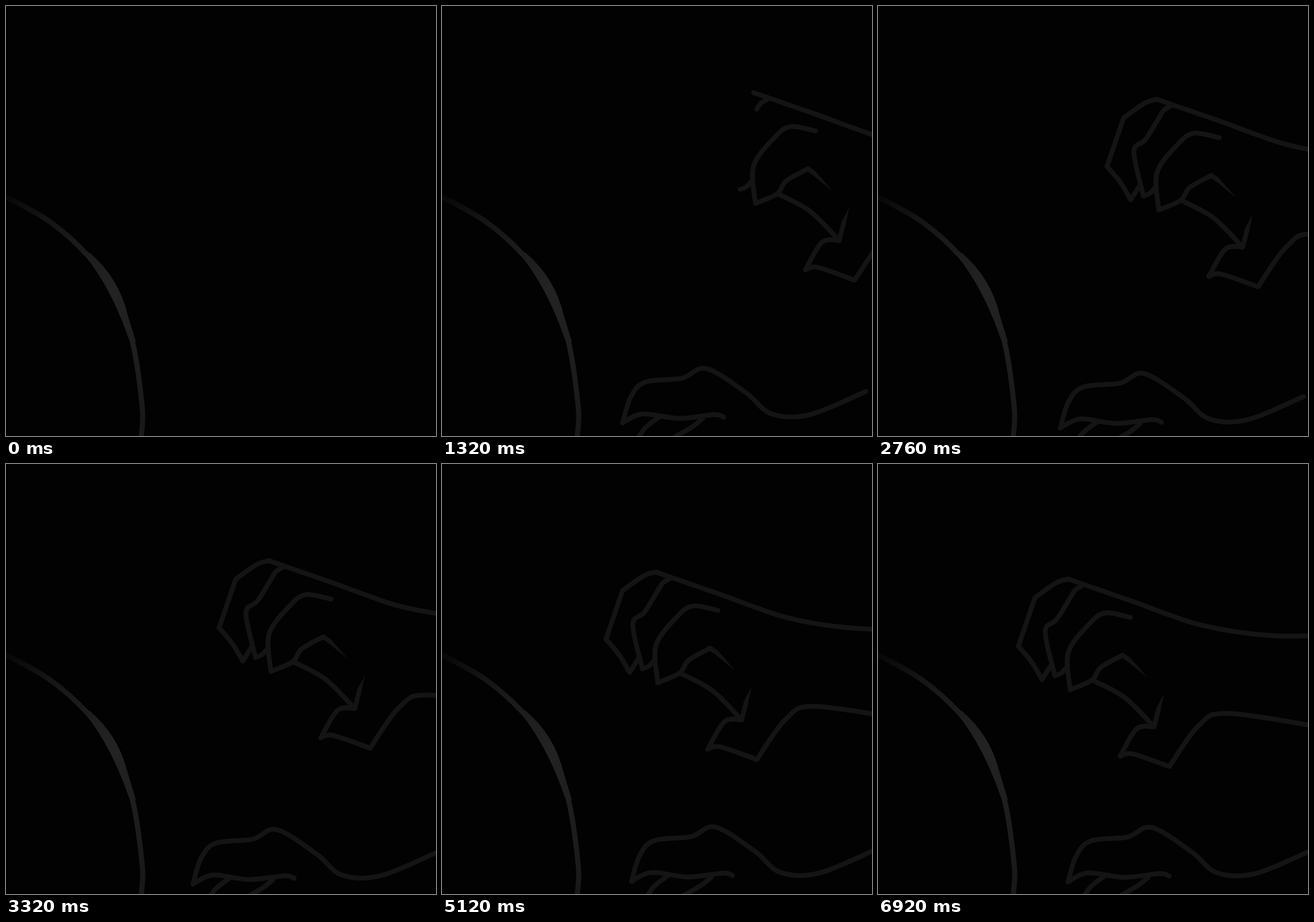
An HTML page that plays this animation: 672 px wide and 672 px high, repeating every 7 s.

```html
<!DOCTYPE html>
<html lang="en">
<head>
<meta charset="utf-8">
<title>Reaching hands</title>
<style>
  html, body { margin: 0; width: 100%; height: 100%; overflow: hidden; background: #020202; }
  svg { display: block; width: 100%; height: 100%; }
  path { fill: none; stroke: #141414; stroke-width: 7.5; stroke-linecap: round; stroke-linejoin: round; }
  .taper { fill: #141414; stroke: none; }
  .arc { stroke: url(#fade); stroke-width: 8; }
  .bulge { fill: url(#fade); stroke: none; }
</style>
</head>
<body>
<svg viewBox="0 0 672 672">
  <defs>
    <linearGradient id="fade" gradientUnits="userSpaceOnUse" x1="0" y1="297" x2="215" y2="672">
      <stop offset="0" stop-color="#070707"/>
      <stop offset=".15" stop-color="#151515"/>
      <stop offset=".48" stop-color="#232323"/>
      <stop offset="1" stop-color="#181818"/>
    </linearGradient>
  </defs>
  <g id="moon"></g>
  <g id="upper"><g id="fingers"></g></g>
  <g id="lower"></g>
</svg>
<script>
const $ = id => document.getElementById(id);
const DURATION = 7000, GLIDE = 7100;

// Smooth curve through "x,y x,y ..."; "|" marks a sharp corner.
function curve(text) {
  let d = '', last;
  for (const piece of text.split('|')) {
    const p = piece.trim().split(' ').map(s => s.split(',').map(Number));
    if (last) p.unshift(last);
    else d = 'M' + p[0];
    for (let i = 0; i < p.length - 1; i++) {
      const a = p[i - 1] || p[i], b = p[i], c = p[i + 1], e = p[i + 2] || c;
      const c1 = b.map((v, k) => v + (c[k] - a[k]) / 6);
      const c2 = c.map((v, k) => v - (e[k] - b[k]) / 6);
      d += `C${c1} ${c2} ${c}`;
    }
    last = p.at(-1);
  }
  return d;
}

function add(group, d, cls = '') {
  const path = document.createElementNS('http://www.w3.org/2000/svg', 'path');
  path.setAttribute('d', d);
  path.setAttribute('class', cls);
  $(group).append(path);
}

const line = (group, points) => add(group, curve(points));

add('moon', curve('-4,296 67,336 128,390 167,445 197,522 213,628 211,676'), 'arc');
add('moon', 'M130 385Q176 424 190 482L203 525L192 521Q166 444 125 392Z', 'bulge');

// Forearm and knuckles, middle fingers, palm, thumb
line('upper', '297,180 340,195 395,214 487,247 550,261 625,269 690,268');
line('upper', '318,191 308,197 302,206');
line('upper', '276,331 286,327 296,316');
line('upper', '394,240 355,233 330,250 297,295 300,353 | 334,338 348,318 382,299 | 389,304');
line('upper', '335,338 385,365 431,411');
line('upper', '438,384 431,411 | 404,414 378,457 | 397,453 455,473 | 500,410 545,390 690,411');
add('upper', 'M385 305L392 301L421 334Z', 'taper');
add('upper', 'M434 383L441 385L447 359Z', 'taper');

line('fingers', '297,180 278,186 245,209 | 219,285 | 240,310 256,337 | 270,315');
line('fingers', '302,206 279,243 261,262 276,331');

line('lower', '297,653 310,612 333,589 390,583 428,568 490,606 530,639 590,640 677,604');
line('lower', '297,653 328,639 385,646 440,640 455,644');
line('lower', '318,682 332,661 354,644');
line('lower', '422,646 406,659 380,674');

const ramp = (t, from, to) => Math.min(1, Math.max(0, (t - from) / (to - from)));
const bump = (t, peak, width) => Math.exp(-(((t - peak) / width) ** 2));

function pose(id, x, y, opacity) {
  $(id).setAttribute('transform', `translate(${x} ${y})`);
  $(id).setAttribute('opacity', opacity);
}

function draw(now) {
  const t = now % DURATION;
  const away = (1 + Math.cos(Math.PI * t / GLIDE)) / 2;
  pose('upper', 207 * away, -48 * away ** 0.85, ramp(t, 800, 1300));
  pose('fingers', 0, 0, ramp(t, 1360, 2300));
  pose('lower', -18 * bump(t, 2000, 900) - 5 * away,
    9 * bump(t, 2600, 1000) - 3.5 * away, ramp(t, 600, 1200));
  requestAnimationFrame(draw);
}
draw(performance.now());
</script>
</body>
</html>
```
